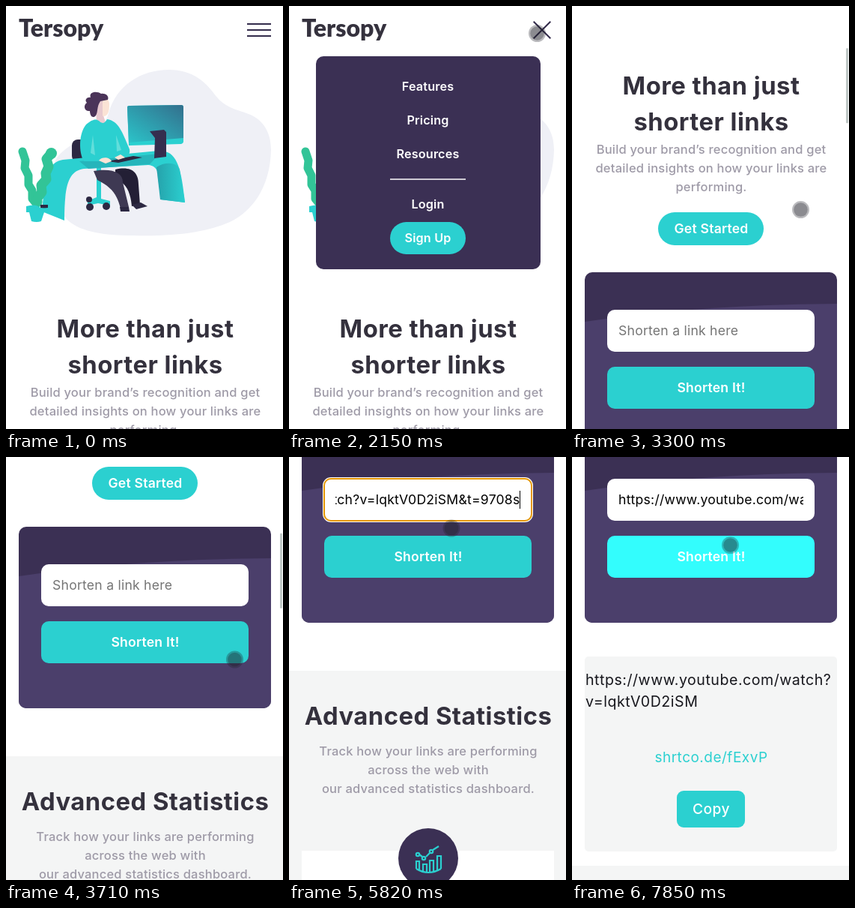
Recreate the animation shown at these times as an HTML page. Size 370x564 px, loop 8000 ms.

```html
<!DOCTYPE html>
<html lang="en">
<head>
<meta charset="utf-8">
<title>Link shortener</title>
<style>
html, body { margin: 0; width: 100%; height: 100%; overflow: hidden; background: #fff; }
svg { display: block; width: 370px; height: 564px; }
text { font-family: Inter, "Open Sans", sans-serif; letter-spacing: .026em; fill: #fff; }
.mid { text-anchor: middle; }
.logo { font: 900 32px Lato, sans-serif; letter-spacing: 0; fill: #35323e; }
.head { font-size: 32.8px; font-weight: 700; letter-spacing: .015em; fill: #34313d; }
.para { font-size: 16.5px; font-weight: 500; letter-spacing: .012em; fill: #9e9aa7; }
.item { font-size: 16.2px; font-weight: 600; letter-spacing: .01em; }
.btn { font-size: 17.6px; font-weight: 600; letter-spacing: .012em; }
.field { font-size: 17.6px; letter-spacing: .013em; }
.teal { fill: #2bd0d0; }
.dark { fill: #3b3054; }
.pale { fill: #f4f5f5; }
.skin { fill: #fbe3d5; }
.ink { fill: #2c2842; }
.stems { fill: none; stroke: #32c497; stroke-linecap: round; stroke-linejoin: round; }
.icon { fill: none; stroke: #2bd0d0; stroke-width: 2.2; }
</style>
</head>
<body>
<svg viewBox="0 0 370 564">
  <defs>
    <linearGradient id="screen" x1="0" y1="1" x2="1" y2="0">
      <stop offset="0" stop-color="#2bc4c9"/><stop offset="1" stop-color="#336f8d"/>
    </linearGradient>
    <linearGradient id="leg" x1="0" x2="1">
      <stop offset="0" stop-color="#25a2ab"/><stop offset="1" stop-color="#2bd0d0"/>
    </linearGradient>
    <clipPath id="card"><rect x="17" y="679" width="337" height="242" rx="10"/></clipPath>
    <clipPath id="inner"><rect x="62" y="730" width="247" height="54"/></clipPath>
  </defs>

  <g id="page">
    <text class="logo" x="17" y="41">Tersopy</text>

    <path fill="#eff0f6" d="M137 143C147 106 180 85 218 85C249 85 266 101 278 117C292 136 306 137 324 144C345 152 354 170 354 192C353 236 334 271 299 288C261 305 210 307 170 306C130 306 101 301 84 287C66 270 58 240 64 212C72 180 127 178 137 143Z"/>

    <!-- chair and legs -->
    <rect class="ink" x="88" y="178" width="24" height="30" rx="8"/>
    <path class="teal" d="M121 215h6v42l12 3v6l-16-3-14 3v-6l12-5Z"/>
    <g class="ink">
      <circle cx="112" cy="268" r="5"/><circle cx="134" cy="267" r="5"/><circle cx="111" cy="258" r="4"/>
      <path fill="#231f35" d="M146 218C168 213 177 222 177 238L179 265L168 267C166 247 161 237 146 230Z"/>
      <path d="M168 265L180 262L189 267L174 271Z"/>
      <path fill="#3e3953" d="M117 220C142 216 156 222 156 235L164 268L153 270C148 250 140 241 122 232Z"/>
      <path d="M152 268H164L165 274H153Z"/>
    </g>

    <!-- desk -->
    <path class="teal" d="M48 274C52 230 54 209 76 205L204 193C228 192 234 214 239 262L206 258C206 226 204 213 190 212L104 217C84 220 78 237 78 286Z"/>
    <path fill="url(#leg)" d="M201 215C212 207 229 208 232 218L239 262L206 258Z"/>
    <path fill="#26b5bb" d="M98 207L205 197L192 211L110 217Z"/>

    <!-- monitor -->
    <path class="teal" d="M162 135Q162 133 165 133L234 132Q237 132 237 135V181Q237 183 234 184L164 186Z"/>
    <path fill="url(#screen)" d="M162 135Q162 133 165 133L234 132Q237 132 237 135V176L164 182Z"/>
    <path fill="#352e4e" d="M192 167L211 165L214 168V201L198 203L199 176Z"/>

    <!-- person -->
    <path fill="#e8c9cf" d="M120 134L130 146L134 158L121 157Z"/>
    <path class="skin" d="M122 128C127 121 138 121 138 131C138 141 136 147 130 147L122 142Z"/>
    <path fill="#e8c9cf" d="M121 128L129 125V147L121 146Z"/>
    <path fill="#4b3459" d="M113 122C110 114 122 113 127 117C134 116 138 121 136 125L126 127C121 134 123 142 120 146C116 151 112 146 112 140C104 141 103 132 108 129C104 125 109 121 113 122Z"/>
    <path class="teal" d="M107 158C115 151 120 150 124 153Q130 160 135 151C150 153 155 167 165 191C167 200 158 204 150 199L126 207L104 207C97 195 97 170 107 158Z"/>
    <path fill="#62dedb" d="M116 172L119 199L113 196ZM147 172L154 192L148 194Z"/>
    <path class="ink" d="M136 207L170 200L182 202L150 209Z"/>
    <path class="skin" d="M124 206C129 200 139 202 141 207L133 210ZM145 202L153 198L159 202L150 205Z"/>

    <!-- plant -->
    <g class="stems">
      <path stroke-width="11" d="M22 194L26 206L25 216L30 226L30 238L35 246L35 257L40 263"/>
      <path stroke-width="13" d="M60 197L54 204L57 214L53 223L54 231L47 239L48 248L42 256V262"/>
    </g>
    <circle fill="#32c497" cx="60.5" cy="196.5" r="7.5"/>
    <path class="ink" d="M46 265H56L56 269L46 270Z"/>
    <path class="teal" d="M27 267Q40 263 46 269L53 270V275H51L47 287Q41 289 34 287L31 275H27Z"/>

    <g class="mid">
      <text class="head" x="186" y="442">More than just</text>
      <text class="head" x="186" y="490">shorter links</text>
      <text class="para" x="186" y="521">Build your brand’s recognition and get</text>
      <text class="para" x="186" y="546">detailed insights on how your links are</text>
      <text class="para" x="186" y="571">performing.</text>
      <rect class="teal" x="115" y="599" width="141" height="44" rx="22"/>
      <text class="btn" x="186" y="627">Get Started</text>
    </g>

    <!-- shortening form -->
    <g clip-path="url(#card)">
      <rect class="dark" x="17" y="679" width="337" height="242"/>
      <path fill="#4b3f6b" d="M17 745Q176 722 354 721V921H17Z"/>
    </g>
    <g id="focus">
      <rect x="45" y="727" width="281" height="60" rx="11" fill="#fff"/>
      <rect x="47" y="729" width="277" height="56" rx="9" fill="#fff" stroke="#e59700" stroke-width="2"/>
    </g>
    <rect id="input" x="47" y="729" width="277" height="56" rx="10" fill="#fff"/>
    <g clip-path="url(#inner)"><text class="field" id="value" y="763"></text></g>
    <path id="caret" stroke="#000" d="M0 745V769"/>
    <rect id="submit" x="47" y="805" width="277" height="56" rx="10"/>
    <text class="btn mid" x="186" y="839">Shorten It!</text>

    <g id="result">
      <rect class="pale" x="17" y="966" width="337" height="260" rx="5"/>
      <g font-size="19.6">
        <text x="18" y="1004" style="fill:#17171d">https://www.youtube.com/watch?</text>
        <text x="18" y="1033" style="fill:#17171d">v=lqktV0D2iSM</text>
      </g>
      <text class="mid" x="186" y="1107" font-size="19" style="fill:#2bd0d0">shrtco.de/fExvP</text>
      <rect class="teal" x="140" y="1145" width="91" height="49" rx="9"/>
      <text class="mid" x="186" y="1176" font-size="19.2" font-weight="500">Copy</text>
    </g>

    <g id="stats">
      <rect class="pale" y="985" width="370" height="400"/>
      <g class="mid">
        <text class="head" x="186" y="1057">Advanced Statistics</text>
        <text class="para" x="186" y="1098">Track how your links are performing</text>
        <text class="para" x="186" y="1123">across the web with</text>
        <text class="para" x="186" y="1148">our advanced statistics dashboard.</text>
      </g>
      <rect x="17" y="1225" width="337" height="160" fill="#fff"/>
      <circle class="dark" cx="186" cy="1235" r="40"/>
      <g class="icon">
        <path d="M170 1249V1239H174V1252M179 1253V1243H184V1254M188 1254V1238H193V1254M198 1252V1232H203V1249M170 1249Q186 1259 203 1249"/>
        <path d="M174 1230L178 1233M183 1233L188 1228M192 1224L200 1219"/>
        <circle cx="172" cy="1230" r="2.2"/><circle cx="180" cy="1235" r="2.2"/><circle cx="190" cy="1226" r="2.2"/>
      </g>
    </g>

    <g id="menu" class="mid">
      <rect class="dark" x="36" y="67" width="300" height="284" rx="10"/>
      <text class="item" x="185.5" y="113">Features</text>
      <text class="item" x="185.5" y="158">Pricing</text>
      <text class="item" x="185.5" y="203">Resources</text>
      <path stroke="#fff" stroke-width="1.5" d="M135 231H236"/>
      <text class="item" x="185.5" y="270">Login</text>
      <rect class="teal" x="135" y="288" width="101" height="43" rx="21.5"/>
      <text class="item" x="185.5" y="315">Sign Up</text>
    </g>
    <g stroke="#332b4b" stroke-width="2">
      <path id="top" d="M-16 0H16"/><path id="middle" d="M322 32H354"/><path id="bottom" d="M-16 0H16"/>
    </g>
  </g>

  <!-- autofill list -->
  <g id="list">
    <rect x="6" y="90" width="359" height="87" rx="6" fill="#fff" stroke="#d5d5da"/>
    <g font-size="12.5">
      <text x="18" y="118" style="fill:#222">https://www.youtube.com/watch?v=lqktV0D2iSM&amp;t=9708s</text>
      <text x="18" y="158" style="fill:#222">https://www.youtube.com/watch?v=lqktV0D2iSM</text>
    </g>
  </g>
  <rect id="thumb" x="366" width="3" height="100" rx="1" fill="#a9b4b2"/>
  <g id="dot"><circle r="11.5" fill-opacity=".3"/><circle r="9.3" fill-opacity=".3"/></g>
</svg>

<script>
const LOOP = 8000;
const URL_TEXT = "https://www.youtube.com/watch?v=lqktV0D2iSM&t=9708s";
const $ = id => document.getElementById(id);
const set = (id, name, value) => $(id).setAttribute(name, value);
const show = (id, on) => set(id, "visibility", on ? "visible" : "hidden");
const move = (id, x, y, turn = 0) => set(id, "transform", `translate(${x} ${y}) rotate(${turn})`);
const within = (t, a, b) => t >= a && t < b;
const ramp = (t, a, b) => Math.min(1, Math.max(0, (t - a) / (b - a)));
const ease = p => p * p * (3 - 2 * p);

// Rows are [time, value, ...]; returns the interpolated values.
function track(t, rows) {
  const next = rows.findIndex(row => row[0] > t);
  if (next === 0) return rows[0].slice(1);
  if (next < 0) return rows[rows.length - 1].slice(1);
  const a = rows[next - 1], b = rows[next], p = ramp(t, a[0], b[0]);
  return a.slice(1).map((v, i) => v + (b[i + 1] - v) * p);
}

const scrollRows = [[3050, 0], [3130, 100], [3200, 200], [3290, 324], [3350, 324], [3370, 400],
  [3500, 400], [3700, 586], [3730, 586], [3850, 680], [3920, 700]];
const dotRows = [[520, 365, 158], [600, 357, 125], [820, 345, 35], [1940, 345, 35],
  [2150, 331.5, 36.5], [2750, 331.5, 36.5], [3050, 305.5, 272.5], [3710, 305.5, 270],
  [4060, 305.5, 270], [4200, 275, 210], [4340, 240, 150], [4410, 222, 77], [4480, 217, 68],
  [5280, 217, 68], [5420, 217, 95], [5820, 217, 95], [6200, 211.5, 117.5]];

function drawMenu(t) {
  const open = ease(ramp(t, 900, 1800)) - ease(ramp(t, 2750, 3200));
  move("menu", -340 * (1 - open), 0);
  show("menu", open > 0);
  move("top", 338, 24 + 8 * open, 135 * open);
  move("bottom", 338, 40 - 8 * open, -135 * open);
  set("middle", "opacity", 1 - open);
}

function drawForm(t) {
  const filled = t >= 5820, focused = within(t, 4820, 6640);
  const value = $("value");
  value.textContent = filled ? URL_TEXT : "Shorten a link here";
  value.style.fill = filled ? "#000" : "#757575";
  value.style.textAnchor = filled && focused ? "end" : "start";
  set("value", "x", filled && focused ? 308.5 : 62);
  show("focus", focused);
  show("input", !focused);
  show("caret", focused && (t - 4820) % 1000 < 500);
  move("caret", filled ? 308.5 : 62.5, 0);
  show("list", within(t, 4820, 5820));
  const lit = ramp(t, 6640, 6920);
  set("submit", "fill", `rgb(${43 + 8 * lit},${208 + 45 * lit},${208 + 45 * lit})`);
}

function drawDot(t) {
  const early = within(t, 120, 190), clicked = within(t, 4680, 4820);
  const [x, y] = early ? [353.5, 504.5] : track(t, dotRows);
  move("dot", x, y);
  show("dot", early || t >= 520);
  set("dot", "fill", clicked ? "#c5c04a" : "#1f1d28");
  for (const ring of $("dot").children) ring.setAttribute("fill-opacity", clicked ? .75 : .3);
}

function draw(t) {
  const [scroll] = track(t, scrollRows);
  move("page", 0, -scroll);
  set("thumb", "y", scroll * .1737);
  set("thumb", "opacity", .75 * (ramp(t, 3050, 3120) - ramp(t, 4200, 4340)));
  const done = t >= 7850;
  show("result", done);
  move("stats", 0, done ? 260 : 0);
  drawMenu(t);
  drawForm(t);
  drawDot(t);
}

const start = performance.now();
function tick() {
  draw((performance.now() - start) % LOOP);
  requestAnimationFrame(tick);
}
tick();
</script>
</body>
</html>
```
